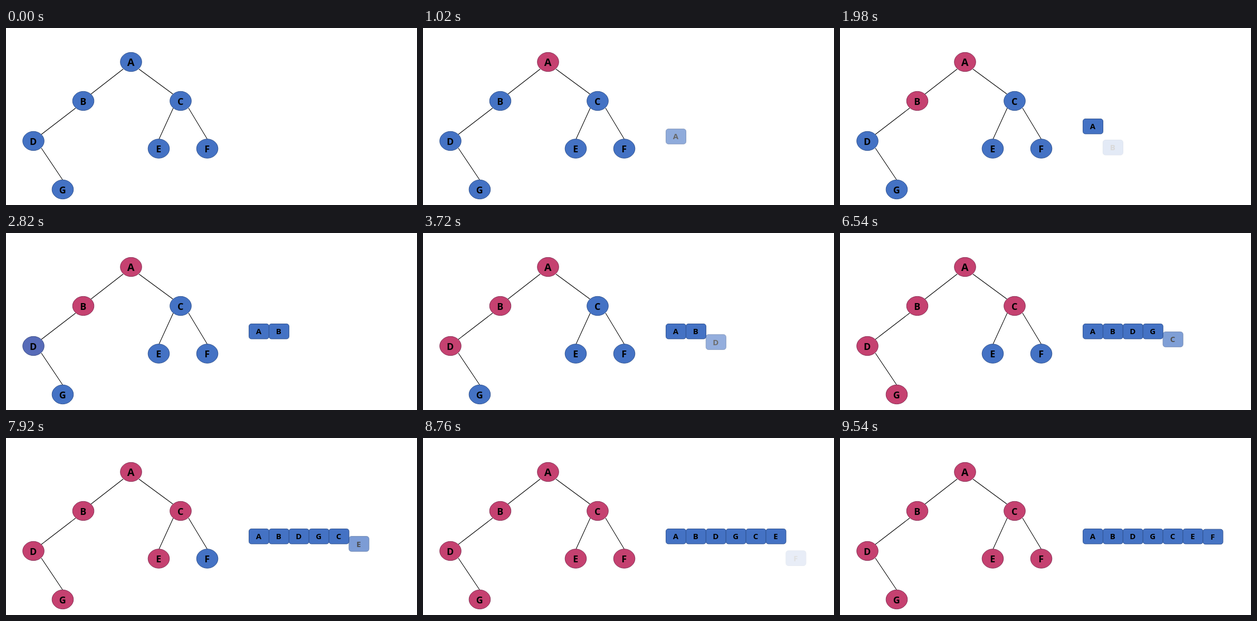
An HTML page that plays this animation: 779x336 px, repeating every 9.6 s.

```html
<!DOCTYPE html>
<html lang="en">
<head>
<meta charset="utf-8">
<title>Preorder traversal</title>
<style>
  html, body { margin: 0; width: 100%; height: 100%; overflow: hidden; background: #fff; }
  svg { display: block; }
  text { font: bold 18px "Noto Sans", "Open Sans", sans-serif; text-anchor: middle; }
  line { stroke: #000; stroke-width: 1.1; }
  rect { fill: #4472c4; stroke: #2f528f; }
</style>
</head>
<body>
<svg id="stage" width="779" height="336" viewBox="0 0 779 336"></svg>
<script>
const LOOP = 9600, STEP = 60;
const START = 32, PERIOD = 1361, TINT = 455, RISE = 900, DROP = 47;
const BLUE = [68, 114, 196], PINK = [197, 65, 112];
const BLUE_EDGE = [47, 82, 143], PINK_EDGE = [132, 46, 84];

// Nodes in visiting order: label, centre x, centre y
const nodes = [
  ['A', 237, 64.5], ['B', 146.5, 138.5], ['D', 52, 214.5], ['G', 107.5, 306.5],
  ['C', 331, 138.5], ['E', 289.5, 229], ['F', 381.5, 229]
];
const edges = [
  [222, 78, 161, 125.5], [252, 78, 316.5, 125.5], [132, 152, 67, 202],
  [317, 152, 290, 211], [346, 152, 381.5, 211], [67, 228, 107.5, 288.5]
];

const stage = document.getElementById('stage');

function add(parent, tag, attrs, text = '') {
  const el = document.createElementNS('http://www.w3.org/2000/svg', tag);
  for (const key in attrs) el.setAttribute(key, attrs[key]);
  el.textContent = text;
  return parent.appendChild(el);
}

const clamp = v => Math.min(1, Math.max(0, v));
const mix = (a, b, p) => `rgb(${a.map((v, i) => Math.round(v + (b[i] - v) * p))})`;

for (const [x1, y1, x2, y2] of edges) add(stage, 'line', { x1, y1, x2, y2 });

const items = nodes.map(([label, cx, cy], i) => {
  const oval = add(stage, 'ellipse', { cx, cy, rx: 20.3, ry: 18.2 });
  add(stage, 'text', { x: cx - 0.3, y: cy + 7.3, style: `font-size:${i ? 18 : 20}px` }, label);
  const box = add(stage, 'g', {});
  const x = 460.5 + 37.9 * i;
  add(box, 'rect', { x, y: 172.5, width: 38, height: 28.5, rx: 4.5 });
  add(box, 'text', { x: x + 18.5, y: 192.3, style: 'font-size:15px' }, label);
  return { oval, box };
});

function draw(t) {
  items.forEach(({ oval, box }, i) => {
    const local = t - START - i * PERIOD;
    const tint = clamp(local / TINT);
    const rise = clamp((local - TINT) / RISE);
    oval.setAttribute('fill', mix(BLUE, PINK, tint));
    oval.setAttribute('stroke', mix(BLUE_EDGE, PINK_EDGE, tint));
    box.setAttribute('opacity', rise);
    box.setAttribute('transform', `translate(0 ${DROP * (1 - rise)})`);
  });
}

function tick() {
  const t = performance.now() % LOOP;
  draw(Math.floor(t / STEP) * STEP);
  requestAnimationFrame(tick);
}
tick();
</script>
</body>
</html>
```
